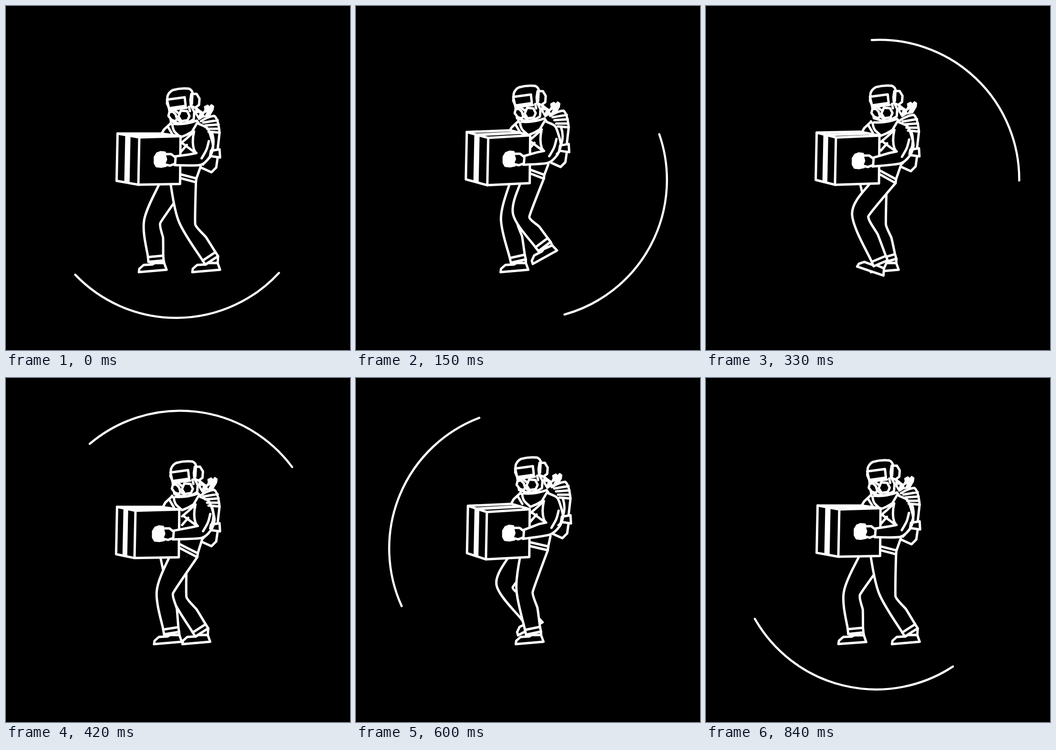
An HTML page for the animation above (870 ms loop, 720 px wide and 720 px high).

```html
<!DOCTYPE html>
<html lang="en">
<head>
<meta charset="utf-8">
<title>Carrier</title>
<style>
html, body { margin: 0; width: 100%; height: 100%; overflow: hidden; background: #000; }
svg { display: block; width: 100vw; height: 100vh; }
path { fill: none; stroke: #fff; stroke-width: 5; stroke-linecap: round; stroke-linejoin: round; }
.solid { fill: #000; }
.white { fill: #fff; stroke-width: 3.4; }
.mask { fill: #000; stroke: none; }
.thin { stroke-width: 4.5; }
</style>
</head>
<body>
<svg id="stage" viewBox="0 0 720 720"></svg>
<script>
const STEP = 30, COUNT = 29;
const CYCLE = 28.3;   // steps in one full stride
const SWING = 13.9;   // steps a foot spends off the ground
const GROUND = 557;
const stage = document.getElementById('stage');
let phase = 0;

function add(tag, parent, attrs = {}) {
  const el = document.createElementNS('http://www.w3.org/2000/svg', tag);
  for (const k in attrs) el.setAttribute(k, attrs[k]);
  return parent.appendChild(el);
}
const path = (cls = '', d = '', parent = stage) => add('path', parent, { class: cls, d });
const group = () => add('g', stage);
const draw = (el, d) => el.setAttribute('d', d);
const move = (el, x, y) => el.setAttribute('transform', `translate(${x} ${y})`);

const at = p => p[0].toFixed(2) + ' ' + p[1].toFixed(2);
const line = pts => 'M' + pts.map(at).join('L');
const mix = (a, b, k) => [a[0] + (b[0] - a[0]) * k, a[1] + (b[1] - a[1]) * k];
const shift = (p, dx, dy) => [p[0] + dx, p[1] + dy];

// Mean plus one swing per stride (c, s) and one per step (c2, s2)
const wave = (mean, c, s, c2 = 0, s2 = 0) =>
  mean + c * Math.cos(phase) + s * Math.sin(phase) +
  c2 * Math.cos(2 * phase) + s2 * Math.sin(2 * phase);

// Smooth line through points, tension k
function curve(pts, k = 1 / 6) {
  let d = 'M' + at(pts[0]);
  for (let i = 0; i + 1 < pts.length; i++) {
    const a = pts[Math.max(i - 1, 0)], b = pts[i], c = pts[i + 1];
    const e = pts[Math.min(i + 2, pts.length - 1)];
    const p = shift(b, (c[0] - a[0]) * k, (c[1] - a[1]) * k);
    const q = shift(c, (b[0] - e[0]) * k, (b[1] - e[1]) * k);
    d += `C${at(p)} ${at(q)} ${at(c)}`;
  }
  return d;
}

// A foot lifts in an arch, heel first, then lands toe up
function step(f, start) {
  const q = ((f - start + CYCLE) % CYCLE) / SWING;
  if (q >= 1) return { lift: 0, tilt: 0 };
  return {
    lift: 19 * Math.sin(Math.PI * q),
    tilt: -0.42 * Math.sin(2 * Math.PI * q ** 1.4)
  };
}

function makeLeg() {
  const fill = path('mask'), front = path(), back = path();
  const cuff = path('solid'), shoe = path('solid'), band = path('solid');
  return (hipFront, hipBack, knee, toeX, { lift, tilt }) => {
    const toe = [toeX, GROUND - lift], c = Math.cos(tilt), s = Math.sin(tilt);
    const local = (x, y) => shift(toe, x * c - y * s, x * s + y * c);
    const kneeFront = shift(knee, -34, -5);
    const mid = mix(knee, kneeFront, 0.5), ankle = local(35, -33);
    const len = Math.hypot(ankle[0] - mid[0], ankle[1] - mid[1]);
    const dx = (ankle[0] - mid[0]) / len, dy = (ankle[1] - mid[1]) / len;
    const P = shift(ankle, -16 * dy, 16 * dx), Q = shift(ankle, 16 * dy, -16 * dx);
    const P2 = shift(P, 10 * dx, 10 * dy), Q2 = shift(Q, 10 * dx, 10 * dy);
    const calf = shift(mix(knee, Q, 0.45), 3, 0);

    const a = curve([hipFront, kneeFront, P]);
    draw(front, a);
    draw(back, curve([hipBack, knee, calf, Q], 0.06));
    draw(fill, a + curve([Q, calf, knee, hipBack], 0.06).replace('M', 'L') + 'Z');
    draw(cuff, line([P2, Q2, local(53, -19), local(33, -19)]) + 'Z');
    draw(shoe, line([local(33, -19), local(28, -16), local(10, -15), local(1, -7),
      local(0, 0), local(58, -5), local(53, -19)]) + 'Z');
    draw(band, line([P, Q, Q2, P2]) + 'Z');
  };
}

const arc = path('thin', `M${at(arcEnd(-46.8))}A292.4 292.4 0 0 1 ${at(arcEnd(46.8))}`);
function arcEnd(deg) {
  const r = (89.5 + deg) * Math.PI / 180;
  return [356.3 + 292.4 * Math.cos(r), 360.4 + 292.4 * Math.sin(r)];
}

const farLeg = makeLeg(), nearLeg = makeLeg();

const pack = group();
path('', 'M408 241Q424 231 436 230Q444 236 447 265L424 263M413 244L443 239M417 250L445 248M421 257L446 257', pack);
path('', 'M431 265Q438 285 430 304M447 265Q445 282 443 300', pack);
path('', 'M429 303L447 300L448 317L427 314Z', pack);
path('', 'M443 317L440 338L430 348L410 339M427 316L412 332', pack);

const torso = group();
path('', 'M345 245L349 250Q350 261 356 266L366 275L378 270L390 263L400 246', torso);
path('', 'M352 247Q375 249 400 240L404 246', torso);
path('', 'M326 268L331 259L345 246M340 254L349 269', torso);
path('', 'M366 288L380 276L394 263M369 287L396 307M366 306L379 291', torso);
path('', 'M394 263Q389 286 394 301L398 308', torso);
const side = path(), belt = path();

const head = group();
path('white', 'M397 212L407 220L413 224L417 217L416 211L422 208L426 212L430 207L434 210L433 217L426 229L412 232L404 237L398 227Z', head);
path('mask', 'M400 224L405 224L403 230ZM414 226L420 222L416 230Z', head);
path('solid', 'M341 213L337 204L338 189Q341 180 349 176Q366 171 383 173Q390 176 391 184L388 210L394 222L393 237Q378 247 362 246L345 241Z', head);
path('', 'M337 196L374 191L376 209L341 214Z', head);
path('', 'M343 218L360 215L378 213M383 211L385 220', head);
path('solid', 'M349 221L342 222L340 230L346 238L354 241L358 237L355 227Z', head);
path('solid', 'M366 219L379 220L384 230L380 239L367 241L361 231Z', head);
path('', 'M354 219L362 225M359 237L366 243', head);
path('solid', 'M388 184L399 184L405 194L404 207L396 213L387 209L386 197Z', head);
path('', 'M390 188L389 205', head);

const carton = path('solid'), edges = path(), tape = path('white');

const arm = path('mask'), armLine = path(), crease = path();
const hand = group();
path('white', 'M333 306L324 305L316 308L311 316L311 329L315 336L325 337L335 335Z', hand);
path('solid', 'M332 310L346 310L355 317L354 330L343 334L331 331L335 321Z', hand);

function drawBox() {
  const tilt = wave(0.45, 0, 0, -0.45);
  const a = [wave(233, 0.5, -1.5), wave(266.3, -1.5, -2, 2.2, 1.6)];
  const b = shift(a, 91, -5 * tilt);
  const d = [wave(275, 4, 0), a[1] + 8 + 6 * tilt];
  const c = [wave(364, 1.3, 0), d[1] - 2.5 - 4 * tilt];
  const e = shift(a, -2, 99), f = shift(d, -2, 99), g = shift(c, -1, 100);
  draw(carton, line([a, b, c, g, f, e]) + 'Z');
  draw(edges, line([a, d, c]) + line([d, f]));
  const strip = k => [mix(e, f, k), mix(a, d, k), mix(b, c, k)];
  draw(tape, line([...strip(0.39), ...strip(0.56).reverse()]) + 'Z');
}

function drawBody(hip) {
  const tx = wave(-1, -1.5, -2, 2, -1), ty = wave(-3.2, -1, 0, 4, 1.8);
  const wx = wave(-2.7, 1.9, -0.3, 0.7), wy = wave(2, -2.4, -1.5, 0.5);
  move(head, wave(-0.3, -3.5, -0.8, 3.8, -3.8), wave(-4.3, -1, -0.4, 5.3, 3.2));
  move(pack, wave(0, 0, -2), wave(-5.8, -2, 0.6, 7.8, -0.3));
  move(torso, tx, ty);
  move(hand, wx, wy);

  const T = (x, y) => [x + tx, y + ty], W = (x, y) => [x + wx, y + wy];
  const waist = [364, wave(346, 2, -2, 4, -0.5)], hem = shift(hip, -1, 8);
  draw(side, line([T(408, 336), hip]));
  draw(belt, line([waist, hip, hem, shift(waist, 0, 8)]));

  const elbow = T(407, 333), wrist = W(353, 333);
  const upper = [W(353, 315), T(384, 311), T(399, 308)];
  const lower = [T(404, 247), T(422, 256), T(430, 276), T(434, 296), T(427, 316), elbow, wrist];
  draw(arm, line([...upper, T(427, 316), elbow, wrist]) + 'Z');
  draw(armLine, line(upper) + curve(lower, 0.13));
  draw(crease, curve([T(425, 283), T(420, 301), T(410, 319)]));
}

function render(ms) {
  const f = Math.floor(ms / STEP) % COUNT;
  phase = 2 * Math.PI * f / CYCLE;
  arc.setAttribute('transform', `rotate(${-12.355 * f} 360.3 360.4)`);

  const hip = [wave(399, -1.5, -4, 1), wave(358, -3, 0.9, 5.9, -0.7)];
  farLeg([322, 370], [378, 375],
    [wave(342.6, -27, 14.8, 7.4, -2.5), wave(449.7, -2, 6.6, 6.3, -0.7)],
    wave(321, -46, -3.8, 3.1, 9.2), step(f, CYCLE / 2));
  nearLeg([344, 370], shift(hip, -1, 8),
    [wave(367, 23, -13.7, 6.1, 1.9), wave(447.5, 3, -6, 6.5, 2.2)],
    wave(348, 40, 3, 2, 3.4), step(f, 0));
  drawBody(hip);
  drawBox();
}

const begin = performance.now();
function tick() {
  render(performance.now() - begin);
  requestAnimationFrame(tick);
}
tick();
</script>
</body>
</html>
```
